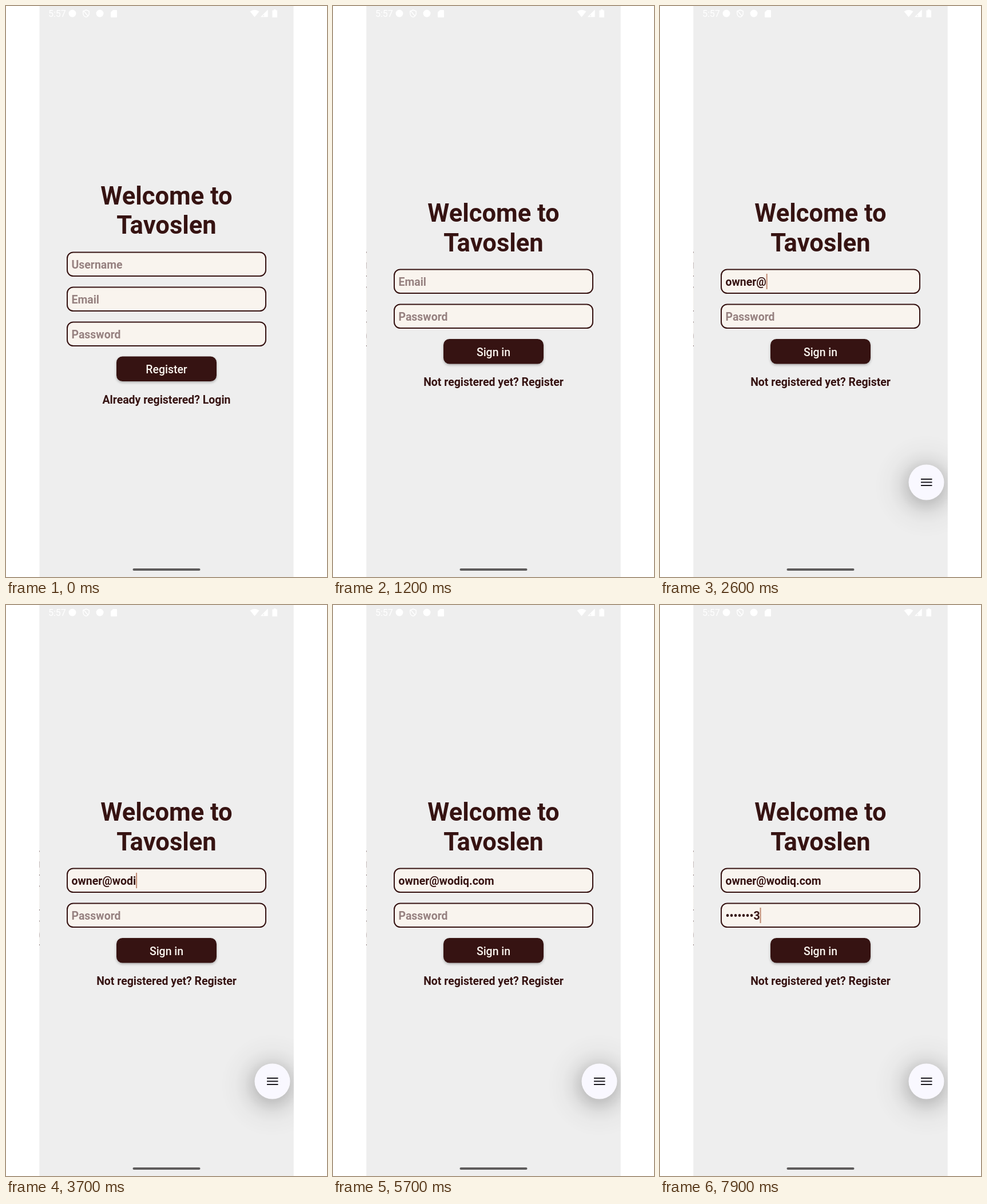
An HTML page for the animation above (8000 ms loop, 561 by 998 pixels).

```html
<!DOCTYPE html>
<html lang="en">
<head>
<meta charset="utf-8">
<title>Sign in</title>
<style>
  html, body { margin: 0; width: 100%; height: 100%; overflow: hidden; background: #fff; }
  svg { display: block; width: 561px; height: 998px; }
  text { font: 700 19.45px Roboto, "Liberation Sans", sans-serif; fill: #361312; white-space: pre; }
  .mid { text-anchor: middle; }
  .title { font-size: 43.5px; }
  .hint { fill: #968180; }
  .label { font-weight: 500; fill: #f9f4ee; }
  .clock { font-size: 16px; font-weight: 400; fill: #fff; }
  .btn { fill: #361312; filter: drop-shadow(0 2px 2px rgba(0, 0, 0, .28)); }

  .leave { animation: leave 8s infinite; }
  .enter { animation: enter 8s infinite; }
  .fade { animation: fade 8s linear infinite; }
  .fab { animation: fab 8s linear infinite; transform-origin: 465px 832px; }

  /* 450 ms slide whose curve is split into two beziers */
  @keyframes leave {
    0% { transform: translateX(0); }
    6.0375% { transform: translateX(0); animation-timing-function: cubic-bezier(.3, 0, .8, .15); }
    6.975% { transform: translateX(-41.6px); animation-timing-function: cubic-bezier(.05, .7, .1, 1); }
    11.6625%, 100% { transform: translateX(-104px); }
  }
  @keyframes enter {
    0% { transform: translateX(104px); }
    6.0375% { transform: translateX(104px); animation-timing-function: cubic-bezier(.3, 0, .8, .15); }
    6.975% { transform: translateX(62.4px); animation-timing-function: cubic-bezier(.05, .7, .1, 1); }
    11.6625%, 100% { transform: translateX(0); }
  }
  @keyframes fade {
    0%, 6.6625% { opacity: 0; }
    7.7%, 100% { opacity: 1; }
  }
  @keyframes fab {
    0%, 22.99% { opacity: 0; transform: translateX(57px) scale(.5); }
    23% { opacity: 1; transform: translateX(57px) scale(.5); }
    26.75%, 100% { opacity: 1; transform: none; }
  }
</style>
</head>
<body>
<svg viewBox="0 0 561 998">
  <defs>
    <clipPath id="screen"><rect x="58.5" width="444" height="998"/></clipPath>
    <rect id="field" x="107" y="1" width="347" height="41.5" rx="10.5" fill="#f9f4ee" stroke="#361312" stroke-width="2"/>
    <rect id="button" class="btn" x="193" width="175" height="43.5" rx="10.5"/>
    <radialGradient id="shade">
      <stop offset=".3" stop-opacity=".17"/>
      <stop offset=".42" stop-opacity=".11"/>
      <stop offset=".56" stop-opacity=".05"/>
      <stop offset=".72" stop-opacity=".018"/>
      <stop offset="1" stop-opacity="0"/>
    </radialGradient>
  </defs>

  <g clip-path="url(#screen)">
    <rect x="58" width="446" height="998" fill="#eee"/>

    <g class="leave">
      <text class="title mid" x="280.5" y="346.5">Welcome to</text>
      <text class="title mid" x="280.5" y="398">Tavoslen</text>
      <use href="#field" y="429.5"/>
      <use href="#field" y="490.5"/>
      <use href="#field" y="551.5"/>
      <text class="hint" x="114.5" y="458.5">Username</text>
      <text class="hint" x="114.5" y="519.5">Email</text>
      <text class="hint" x="114.5" y="580.5">Password</text>
      <use href="#button" y="612.5"/>
      <text class="label mid" x="280.5" y="642">Register</text>
      <text class="mid" x="280.5" y="694.5">Already registered? Login</text>
    </g>

    <g class="fade">
      <rect x="58" width="446" height="998" fill="#eee"/>
      <g class="enter">
        <text class="title mid" x="280.5" y="377">Welcome to</text>
        <text class="title mid" x="280.5" y="428.5">Tavoslen</text>
        <use href="#field" y="459.5"/>
        <use href="#field" y="520.5"/>
        <text id="email" x="114.5" y="489"></text>
        <text id="pass" x="114.5" y="550"></text>
        <rect id="caret" width="2" height="27" fill="#c08a72"/>
        <use href="#button" y="582"/>
        <text class="label mid" x="280.5" y="611.5">Sign in</text>
        <text class="mid" x="280.5" y="664">Not registered yet? Register</text>
      </g>
    </g>

    <g fill="#fff">
      <text class="clock" x="74" y="18.5">5:57</text>
      <circle cx="116" cy="13" r="6.5"/>
      <path d="M140 7l5.2 2v4c0 3-2.2 5.400-5.200 6.300c-3-.9-5.200-3.300-5.200-6.300v-4zM136 9l7 8" fill="none" stroke="#fff" stroke-width="1.4"/>
      <circle cx="164" cy="13" r="6.5"/>
      <path d="M187 7h6q1 0 1 1v11q0 1-1 1h-9q-1 0-1-1v-8z"/>
      <path d="M426.500 9.500q8-5.500 16 0l-8 10z"/>
      <path d="M457 8v10.500h-10.500z" fill="none" stroke="#fff" stroke-width="1.4"/>
      <path d="M457 8v10.500h-6v-4.500z"/>
      <path d="M468 6h3.500v1.500h2.500v12.500h-8.500v-12.500h2.500z"/>
    </g>

    <g class="fab">
      <circle cx="465" cy="839" r="90" fill="url(#shade)"/>
      <circle cx="465.500" cy="832.500" r="31" fill="#f9f8ff"/>
      <path d="M456 827h19.500M456 832.500h19.500M456 838h19.500" stroke="#1d1b20" stroke-width="2"/>
    </g>

    <rect x="221.500" y="983" width="118" height="4" rx="2" fill="#5e5c5c"/>
  </g>
</svg>
<script>
  const LOOP = 8000, BLINK = 500;
  const get = id => document.getElementById(id);
  const caret = get("caret");

  const mask = s => s && "•".repeat(s.length - 1) + s.slice(-1);
  const fields = [
    { el: get("email"), hint: "Email", value: "owner@wodiq.com", focus: 1300, top: 468, show: s => s,
      keys: [1430, 1540, 1640, 1740, 1850, 2550, 3050, 3250, 3450, 3650, 3900, 4150, 4400, 4650, 4900] },
    { el: get("pass"), hint: "Password", value: "owner123", focus: 6500, top: 529, show: mask,
      keys: [6900, 7120, 7250, 7350, 7450, 7560, 7700, 7850] }
  ];

  function draw(t) {
    caret.style.opacity = 0;
    for (const f of fields) {
      const typed = f.keys.filter(k => k <= t);
      const text = f.show(f.value.slice(0, typed.length));
      f.el.textContent = text || f.hint;
      f.el.classList.toggle("hint", !text);
      if (t < f.focus) continue;
      // each key press restarts the blink; the latest focused field owns the caret
      const last = typed.at(-1) ?? f.focus;
      const width = text ? f.el.getComputedTextLength() : 0;
      caret.setAttribute("x", 114.5 + width);
      caret.setAttribute("y", f.top);
      caret.style.opacity = (t - last) % (2 * BLINK) < BLINK ? 1 : 0;
    }
  }

  let start;
  function tick(now) {
    start ??= now;
    draw((now - start) % LOOP);
    requestAnimationFrame(tick);
  }
  draw(0);
  requestAnimationFrame(tick);
</script>
</body>
</html>
```
